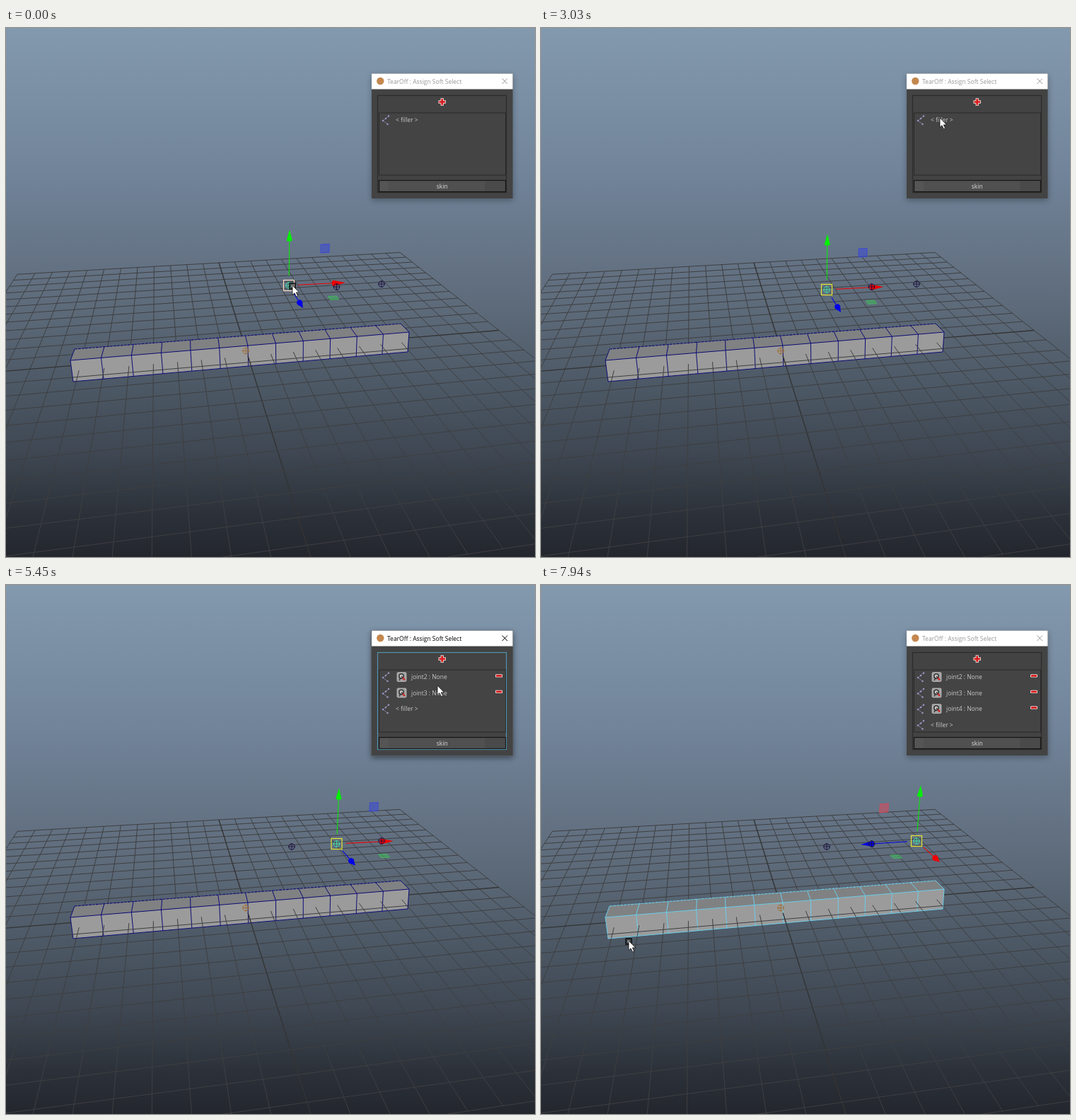
These frames come from a looping animation (748 px wide and 748 px high, 8000 ms). An HTML page:

```html
<!DOCTYPE html>
<html lang="en">
<head>
<meta charset="utf-8">
<title>Assign Soft Select</title>
<style>
  html, body { margin: 0; width: 100%; height: 100%; overflow: hidden; background: #23262d; }
  svg { display: block; width: 100vw; height: 100vh; }
  text { font: 8.5px "Open Sans", "Noto Sans", sans-serif; }
</style>
</head>
<body>
<svg viewBox="0 0 748 748" xmlns="http://www.w3.org/2000/svg">
  <defs>
    <linearGradient id="sky" x1="0" y1="0" x2="0" y2="1">
      <stop offset="0" stop-color="#8399ae"/>
      <stop offset=".27" stop-color="#71849a"/>
      <stop offset=".42" stop-color="#667587"/>
      <stop offset=".54" stop-color="#5c6978"/>
      <stop offset=".67" stop-color="#4d5966"/>
      <stop offset=".8" stop-color="#3f4853"/>
      <stop offset=".92" stop-color="#2c3139"/>
      <stop offset="1" stop-color="#23262d"/>
    </linearGradient>
    <filter id="shade" x="-20%" y="-20%" width="140%" height="140%">
      <feGaussianBlur stdDeviation="4"/>
    </filter>
    <clipPath id="lowFront"><path d="M93 485L569 444L568 458L95 500Z"/></clipPath>
  </defs>
  <rect width="748" height="748" fill="url(#sky)"/>
  <g id="floor"></g>
  <g id="beam"></g>
  <g id="overlap" clip-path="url(#lowFront)"></g>
  <g id="rig"></g>
  <g id="panel"></g>
  <g id="pointer"></g>
</svg>
<script>
const LOOP = 8000;
const $ = id => document.getElementById(id);
const range = n => Array.from({ length: n }, (_, i) => i);
const lerp = (a, b, k) => a + (b - a) * k;
const ease = k => k * k * (3 - 2 * k);
const mix = (a, p, b, q) => a.map((v, i) => v * p + b[i] * q);
const within = (n, [a, b]) => n >= a && n < b;

const path = (d, attrs) => `<path d="${d}" ${attrs}/>`;
const line = (a, b, color, w = 1) => path(`M${a}L${b}`, `stroke="${color}" stroke-width="${w}"`);
const poly = (points, attrs) => path(`M${points.join('L')}Z`, attrs);
const rect = (x, y, w, h, attrs) => `<rect x="${x}" y="${y}" width="${w}" height="${h}" ${attrs}/>`;
const dot = (x, y, r, attrs) => `<circle cx="${x}" cy="${y}" r="${r}" ${attrs}/>`;
const label = (x, y, s, color, extra = '') => `<text x="${x}" y="${y}" fill="${color}" ${extra}>${s}</text>`;

// Ground plane, coordinates from -1 to 1
function ground(x, z) {
  const w = 1 + 0.077 * x - 0.4366 * z;
  return [(410.7 * x - 92.4 * z + 340) / w, (3.4 * x - 19.95 * z + 457) / w];
}

function drawFloor() {
  return range(25).map(i => {
    const k = i / 12 - 1, color = k ? '#3e3f41' : '#343434', w = k ? 1 : 1.4;
    return line(ground(k, -1), ground(k, 1), color, w) + line(ground(-1, k), ground(1, k), color, w);
  }).join('');
}

// Point on a receding edge
function along([a, b], s) {
  const w = 1.1, q = 1 + s * (w - 1);
  return a.map((v, i) => (v + s * (w * b[i] - v)) / q);
}

function drawBeam(lit) {
  const back = [[97, 454], [558, 418]], top = [[91, 470], [570, 430]], low = [[95, 500], [568, 458]];
  const color = lit ? '#6bcdea' : '#0c0c74';
  const face = ([a, b], [c, d], fill) => poly([a, b, d, c], `fill="${fill}"`);
  let s = face(back, top, '#808182') + face(top, low, '#9b9b9b');
  for (const i of range(13)) {
    const [a, b, c] = [back, top, low].map(edge => along(edge, i / 12));
    s += line(a, b, color) + line(b, c, color);
  }
  s += line(...top, color) + line(...low, color);
  s += path(`M${back[0]}L${back[1]}`, `stroke="${color}" stroke-width="1.1" stroke-dasharray="4 1"`);
  return s + joint([339, 456.5], '#a06c32');
}

function joint([x, y], color) {
  return dot(x, y, 4.2, `fill="none" stroke="${color}"`) +
    path(`M${x - 5} ${y}h10M${x} ${y - 5}v10`, `stroke="${color}" stroke-width=".9"`);
}

const RED = '#f00000', GREEN = '#00f000', BLUE = '#0000e6';
const home = i => [404 + 63.5 * i, 370 - 4 * i];

function arrow([dx, dy], color, cone, start, round) {
  const len = Math.hypot(dx, dy), shaft = len - cone;
  const turn = Math.atan2(dy, dx) * 180 / Math.PI;
  return `<g transform="rotate(${turn})" fill="${color}">` + line([start, 0], [shaft, 0], color) +
    poly([[shaft, -4], [len, 0], [shaft, 4]], '') + `<ellipse cx="${shaft}" rx="${round}" ry="4"/></g>`;
}

// Handle for moving in the plane of two axes
function plane(a, b, color) {
  const at = (p, q) => mix(a, 0.63 + p, b, 0.63 + q), r = 0.075;
  return poly([at(-r, -r), at(r, -r), at(r, r), at(-r, r)],
    `fill="${color}" fill-opacity=".55" stroke="${color}" stroke-width=".9"`);
}

function gizmo(i, [ox, oy], active) {
  const flip = i === 2, [x, y] = home(i);
  const up = [1 + 2.5 * i, -79], side = flip ? [-79, 5] : [80, -4], near = [20 + 6.5 * i, 32 - i];
  return `<g transform="translate(${x + ox} ${y + oy})">` +
    plane(up, side, flip ? '#d84a5c' : '#3a48d8') + plane(side, near, '#42b85c') +
    arrow(up, GREEN, 15, 14, 1.5) + arrow(side, flip ? BLUE : RED, 17, 13, 2) +
    arrow(near, flip ? RED : BLUE, 9, 13, 4) +
    joint([0, 0], '#3fe0a4') +
    rect(-7.5, -7.5, 15, 15, `fill="none" stroke="${active ? '#ffd9c0' : '#e6e632'}" stroke-width="1.2"`) + '</g>';
}

function row(i, name) {
  const y = 130 + 22.5 * i;
  const bones = [[541, y - 5.5], [537, y - 2], [533, y + 1], [539.5, y + 6]];
  let s = path(`M${bones.join('L')}`, 'stroke="#77769c" fill="none"');
  s += bones.map(([a, b]) => dot(a, b, 1.2, 'fill="#9c9ac6"')).join('');
  if (!name) return s + label(551, y + 3, '&lt; filler &gt;', '#c8c8c8');
  return s + rect(553, y - 6.5, 13, 13, 'rx="1.5" fill="#a2a2a2" stroke="#c4c4c4" stroke-width=".7"') +
    dot(559, y - 1, 3.2, 'fill="#c9c9c9" stroke="#333" stroke-width="1.5"') +
    path(`M556 ${y + 5}l2 -4M559 ${y - 1}l4 4.5`, 'stroke="#333" stroke-width="1.4"') +
    path(`M561 ${y + 1}l3 3.5`, 'stroke="#d02525" stroke-width="2"') +
    label(573, y + 3, `${name} : None`, '#c8c8c8') +
    rect(692, y - 3.8, 10, 4.4, 'rx="1" fill="#f4dada"') + rect(693, y - 2.9, 8, 2.6, 'fill="#d81818"');
}

function drawPanel(count, focus, ring) {
  const ink = focus ? '#000' : '#989898', edge = ring ? '#4f93ad' : '#2b2b2b';
  let s = rect(517, 67, 200, 177, `fill="#000" opacity="${focus ? 0.5 : 0.28}" filter="url(#shade)"`);
  if (focus) s += rect(516, 64, 201, 178, 'fill="#565e67"');
  s += rect(517, 64.5, 199.5, 176.5, 'fill="#434343"') + rect(517, 64.5, 199.5, 22, 'fill="#fff"');
  s += dot(529.3, 75, 5.2, 'fill="#c4884f"');
  s += label(539, 78.5, 'TearOff : Assign Soft Select', ink);
  s += path('M701.5 71.5l7.5 7.5m0 -7.5l-7.5 7.5', `stroke="${ink}"`);
  s += rect(525.5, 95.5, 182, 137, `fill="#434343" stroke="${edge}" stroke-width="1.2"`);
  s += path('M616.7 99.3v10.4M611.5 104.5h10.4', 'stroke="#f4dada" stroke-width="4.4"');
  s += path('M616.7 100.2v8.6M612.4 104.5h8.6', 'stroke="#d81818" stroke-width="2.6"');
  s += rect(527.5, 120, 179, 88, 'fill="#444" stroke="#2a2a2a"');
  for (const i of range(count + 1)) s += row(i, i < count && `joint${i + 2}`);
  s += rect(527.5, 215.5, 179, 16, 'fill="#4a4a4a" stroke="#161616" stroke-width="1.2"');
  s += rect(528.5, 216.5, 12.5, 14, 'fill="#555"') + rect(541, 216.5, 136, 14, 'fill="#505050"');
  return s + label(616.7, 226.8, 'skin', '#dcdcdc', 'text-anchor="middle"');
}

function drawPointer([x, y], corner) {
  const inPanel = x > 516 && x < 717 && y > 64 && y < 242;
  let s = '';
  if (corner) s += poly([corner, [x + 2, corner[1]], [x + 2, y - 2], [corner[0], y - 2]],
    'fill="none" stroke="#fff" stroke-dasharray="2 1.6"');
  if (!inPanel) s += rect(x - 4, y - 4, 8, 8, 'fill="none" stroke="#111" stroke-width="1.6"') +
    rect(x - 2, y - 2, 4, 4, 'fill="#ddd" stroke="#111" stroke-width=".8"');
  return s + path(`M${x} ${y - 1}v13.5l3 -2.8l2.4 5l2.2 -1l-2.3 -4.8h4.2Z`,
    'fill="#fff" stroke="#111" stroke-width=".8"');
}

const stepStart = n => 138.8 * n - 0.085 * n * n;
const stepAt = t => range(60).filter(n => stepStart(n) <= t).pop();

// Pointer stops: step, x, y
const plus = [611, 107], grip = [409, 371];
const stops = [
  [0, 405, 365], [2, ...grip], [4, ...home(1)], [6, 472, 351], [7, ...home(1)],
  [9, 523, 350], [10, ...home(2)], [12, 543, 352], [14, ...home(2)],
  [17, 428, 346], [19, 386, 388], [22, 564, 128], [24, ...plus], [25, ...plus],
  [30, 488, 338], [33, 462, 376], [37, ...plus], [38, ...plus], [40, 610, 143],
  [43, 551, 338], [45, 514, 376], [48, ...plus], [51, 544, 231], [57, 196, 490], [59, 124, 504]
];

function pointerAt(n) {
  const i = Math.max(1, stops.findIndex(s => s[0] >= n));
  const [a, ...p] = stops[i - 1], [b, ...q] = stops[i];
  const k = ease((n - a) / (b - a));
  return p.map((v, j) => lerp(v, q[j], k));
}

// Spans of steps, one for each joint in turn
const drags = [[0, 2], [4, 7], [10, 14]];
const marquees = [[17, 20], [30, 34], [43, 46]];
const visits = [[25, 30], [38, 43], [48, 56]];
const picks = [...drags.map(d => d[0]), ...marquees.map(m => m[1])];

function draw(n) {
  const p = pointerAt(n);
  const sel = (picks.filter(s => s <= n).length - 1) % 3;
  const drag = drags.find(d => within(n, d));
  const offset = drag ? mix(p, 1, sel ? home(sel) : grip, -1) : [0, 0];
  const marquee = marquees.find(m => within(n, m));
  const focus = visits.some(v => within(n, v));
  const count = visits.filter(v => v[0] <= n).length;
  const idle = range(3).filter(i => i !== sel);

  $('beam').innerHTML = drawBeam(n >= 58);
  $('rig').innerHTML = gizmo(sel, offset, drag) + idle.map(i => joint(home(i), '#1b1040')).join('');
  $('panel').innerHTML = drawPanel(count, focus, focus || within(n, [56, 58]));
  $('pointer').innerHTML = drawPointer(p, marquee && pointerAt(marquee[0]));
}

$('floor').innerHTML = $('overlap').innerHTML = drawFloor();

let shown = -1;
const begin = performance.now();
function tick() {
  const now = stepAt((performance.now() - begin) % LOOP);
  if (now !== shown) draw(shown = now);
  requestAnimationFrame(tick);
}
tick();
</script>
</body>
</html>
```
